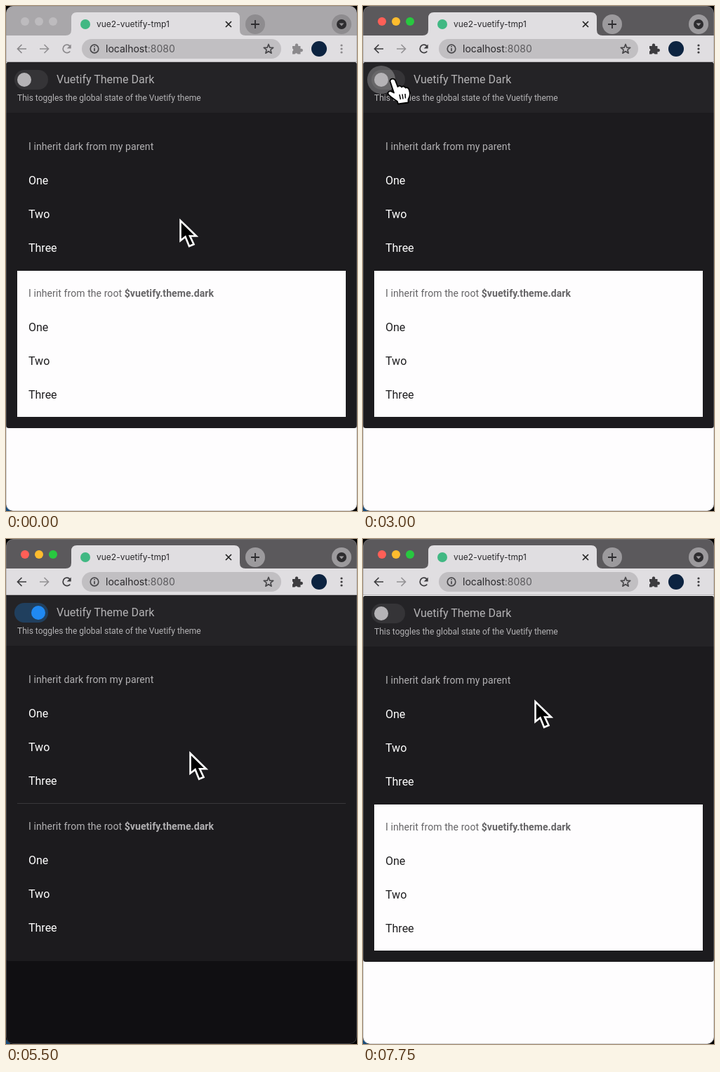
An HTML page that plays this animation: 500 px wide and 719 px high, repeating every 7.87 s.

```html
<!DOCTYPE html>
<html lang="en">
<head>
<meta charset="utf-8">
<title>Theme toggle</title>
<style>
html, body { margin: 0; width: 100%; height: 100%; overflow: hidden; background: #000; }
svg { display: block; width: 100vw; height: 100vh; }
.ui { font-family: Inter, sans-serif; }
.app { font-family: Roboto, sans-serif; }
.item { font-size: 16px; }
.sub { font-size: 14px; letter-spacing: .08px; }
.line { fill: none; stroke: currentColor; stroke-width: 1.7; }
</style>
</head>
<body>
<svg viewBox="0 0 500 719">
  <defs>
    <clipPath id="win"><rect width="500" height="719" rx="10"/></clipPath>
    <clipPath id="view"><rect y="80" width="500" height="639"/></clipPath>
  </defs>
  <rect width="500" height="719" fill="#000"/>
  <rect y="713" width="6" height="6" fill="#174a78"/>
  <g clip-path="url(#win)">
    <rect id="page" y="78" width="500" height="641"/>
    <g clip-path="url(#view)">
      <g id="app" class="app">
        <rect y="80" width="500" height="521" rx="4" fill="#1c1b1e"/>
        <path d="M0 152V84q0-4 4-4H496q4 0 4 4V152Z" fill="#242326"/>
        <rect id="track" x="12" y="91" width="48" height="28" rx="14"/>
        <circle id="halo" cy="105" r="20" fill="#fff"/>
        <circle id="thumb" cy="105" r="10"/>
        <text x="72" y="110" class="item" fill="#b4b3b5">Vuetify Theme Dark</text>
        <text x="16" y="135" font-size="12" fill="#b4b3b5">This toggles the global state of the Vuetify theme</text>
        <text x="32" y="205" class="sub" fill="#b2b1b3">I inherit dark from my parent</text>
        <g id="listA" fill="#fff"></g>
        <rect id="card" x="16" y="377" width="468" height="208" fill="#fefdfe"/>
        <path id="rule" d="M16 376.5H484" stroke="#38373a"/>
        <text id="label" x="32" y="414" class="sub">I inherit from the root <tspan font-weight="700">$vuetify.theme.dark</tspan></text>
        <g id="listB"></g>
      </g>
    </g>

    <rect id="strip" width="500" height="43"/>
    <g id="lights"></g>
    <path d="M0 42H85q8 0 8-8V17q0-8 8-8H325q8 0 8 8V34q0 8 8 8H500V79H0Z" fill="#e0dee1"/>
    <path d="M0 79.5H500" stroke="#b5b3b6"/>
    <g class="ui">
      <circle cx="113" cy="26" r="7" fill="#41b883"/>
      <text x="129" y="30.3" font-size="12" fill="#29282b">vue2-vuetify-tmp1</text>
      <path d="M313 22l8 8m0-8l-8 8" stroke="#222" stroke-width="1.7"/>
      <g id="buttons">
        <circle cx="355" cy="26" r="14"/>
        <circle cx="478" cy="26" r="14"/>
      </g>
      <path d="M349 26h12m-6-6v12" stroke="#2d2c2f" stroke-width="1.8"/>
      <circle cx="478" cy="26" r="7" fill="#2d2c2f"/>
      <path id="chevron" d="M474.5 24.5h7l-3.5 4Z"/>

      <rect x="108" y="47" width="284" height="28" rx="14" fill="#c1bfc2"/>
      <g color="#4a494c">
        <circle cx="126" cy="61" r="5.8" class="line" stroke-width="1.4"/>
        <path d="M126 60v4.3m0-7.3v1.6" class="line"/>
        <path id="star" class="line" stroke-linejoin="round"/>
      </g>
      <text x="142" y="66" font-size="14" fill="#29282b">localhost<tspan fill="#5b5a5d">:8080</tspan></text>
      <g id="icons">
        <path class="line" d="M29 61H16.500m6-6l-6 6l6 6"/>
        <path class="line" d="M48 61h12.500m-6-6l6 6l-6 6" color="#949295"/>
        <path class="line" d="M91.300 64.500a5.700 5.700 0 1 1-.3-7.500"/>
        <path d="M92.700 54.500v6h-6Z" fill="currentColor"/>
        <path d="M408 57h4a2.300 2.300 0 1 1 4 0h3.500v4a2.300 2.300 0 1 1 0 4v3.500h-4a2.200 2.200 0 0 0-4 0H408v-4a2.200 2.200 0 0 0 0-4Z" fill="currentColor"/>
        <g fill="currentColor">
          <circle cx="478" cy="56" r="1.600"/><circle cx="478" cy="61" r="1.600"/><circle cx="478" cy="66" r="1.600"/>
        </g>
      </g>
      <circle cx="446" cy="61" r="11" fill="#0c2340"/>
    </g>
    <rect x=".5" y=".5" width="499" height="718" rx="9.500" fill="none" stroke="#8a898c" stroke-opacity=".4"/>
  </g>
  <path id="arrow" d="M1.500 3.500V32L8.500 26.500L14 40L20.500 37.300L15 25.500H24Z" fill="#000" stroke="#fff" stroke-width="2.600"/>
  <g id="hand">
    <path d="M-3.500 3C-3-1 2.500-1.500 4 2L7.500 11C8.500 9 12 9 13 11.500C14.500 10 17.500 10 18.500 12.500C21 11.500 23 13 23.500 15C25.500 20 25 25 22.500 29V33.500L8 35.500L7 32C3 29-1 27-5 23C-8 20-6 16.500-2 17.500L2 19.500Z" fill="#fff" stroke="#000" stroke-width="1.800" stroke-linejoin="round"/>
    <path d="M10 22l1.500 7m2.500-7.500l1 7m3-7.500l.5 6.500" stroke="#000" stroke-width="1.500"/>
  </g>
</svg>
<script>
const LOOP = 7870, STEP = 125;
const $ = id => document.getElementById(id);
const set = (id, attrs) => { for (const k in attrs) $(id).setAttribute(k, attrs[k]); };

const list = (id, y) => {
  $(id).innerHTML = ["One", "Two", "Three"]
    .map((s, i) => `<text x="32" y="${y + i * 48}" class="item">${s}</text>`).join("");
};
list("listA", 254);
list("listB", 463);
$("lights").innerHTML = [27, 47, 67].map(x => `<circle cx="${x}" cy="22" r="6"/>`).join("");

const star = Array.from({ length: 10 }, (_, i) => {
  const r = i % 2 ? 3 : 7, a = i * Math.PI / 5;
  return [374 + r * Math.sin(a), 61.5 - r * Math.cos(a)].map(v => v.toFixed(1));
});
set("star", { d: "M" + star.join("L") + "Z" });

// Rows are [time, value, ...]
const cursorKeys = [[1750, 247, 302], [2625, 41, 104], [2750, 42, 104], [3125, 42, 104],
  [3625, 277, 367], [4000, 287, 323], [5375, 287, 323], [6000, 37, 118], [6375, 37, 118], [7000, 244, 228]];
const scrollKeys = [[125, 0], [500, 30], [875, 30], [1125, 10], [1375, 0], [3875, 0], [4375, 42], [4625, 30],
  [4750, 21], [5000, 7], [5250, 0], [7000, 0], [7250, 36], [7500, 10], [7625, 3], [7750, 1]];
const thumbKeys = [[3000, 0], [3125, .3], [3250, .85], [3375, 1], [6000, 1], [6125, .95], [6250, .55], [6375, .1], [6500, 0]];
const haloKeys = [[2875, 0], [3000, .25], [3250, .16], [3500, 0], [6000, 0], [6125, .22], [6250, .13], [6500, 0]];

const smooth = p => p * p * (3 - 2 * p);
const linear = p => p;
function sample(keys, t, ease = linear) {
  const i = keys.findIndex(k => k[0] > t);
  if (i < 0) return keys[keys.length - 1].slice(1);
  if (!i) return keys[0].slice(1);
  const a = keys[i - 1], b = keys[i], p = ease((t - a[0]) / (b[0] - a[0]));
  return a.slice(1).map((v, n) => v + (b[n + 1] - v) * p);
}
const mix = (a, b, p) => `rgb(${a.map((v, i) => Math.round(v + (b[i] - v) * p))})`;

function draw(ms) {
  const t = Math.floor((ms % LOOP) / STEP) * STEP;
  const active = t >= 125, dark = t >= 3125 && t < 6125;
  const [x, y] = sample(cursorKeys, t, smooth);
  const [scroll] = sample(scrollKeys, t);
  const [on] = sample(thumbKeys, t);
  const [halo] = sample(haloKeys, t);

  set("strip", { fill: active ? "#5b595c" : "#a9a7aa" });
  set("buttons", { fill: active ? "#9c9a9d" : "#8e8c8f" });
  set("chevron", { fill: active ? "#9c9a9d" : "#8e8c8f" });
  set("icons", { color: active ? "#3d3c3f" : "#8b898c" });
  ["#ff5f57", "#febc2e", "#28c840"].forEach((c, i) =>
    $("lights").children[i].setAttribute("fill", active ? c : "#bdbbbe"));

  set("page", { fill: dark ? "#100f12" : "#fefdfe" });
  set("app", { transform: `translate(0 ${Math.round(scroll)})` });
  set("card", { opacity: dark ? 0 : 1 });
  set("rule", { opacity: dark ? 1 : 0 });
  set("label", { fill: dark ? "#b2b1b3" : "#656466" });
  set("listB", { fill: dark ? "#fff" : "#1f1e20" });

  const cx = 26 + 20 * on;
  set("track", { fill: mix([53, 52, 55], [32, 63, 94], on) });
  set("thumb", { cx, fill: mix([181, 179, 182], [32, 137, 242], on) });
  set("halo", { cx, opacity: halo });

  const over = x < 60 && y < 125, at = `translate(${x.toFixed(1)} ${y.toFixed(1)})`;
  set("arrow", { transform: at, opacity: over ? 0 : 1 });
  set("hand", { transform: at, opacity: over ? 1 : 0 });
}

const start = performance.now();
function tick() {
  draw(performance.now() - start);
  requestAnimationFrame(tick);
}
tick();
</script>
</body>
</html>
```
